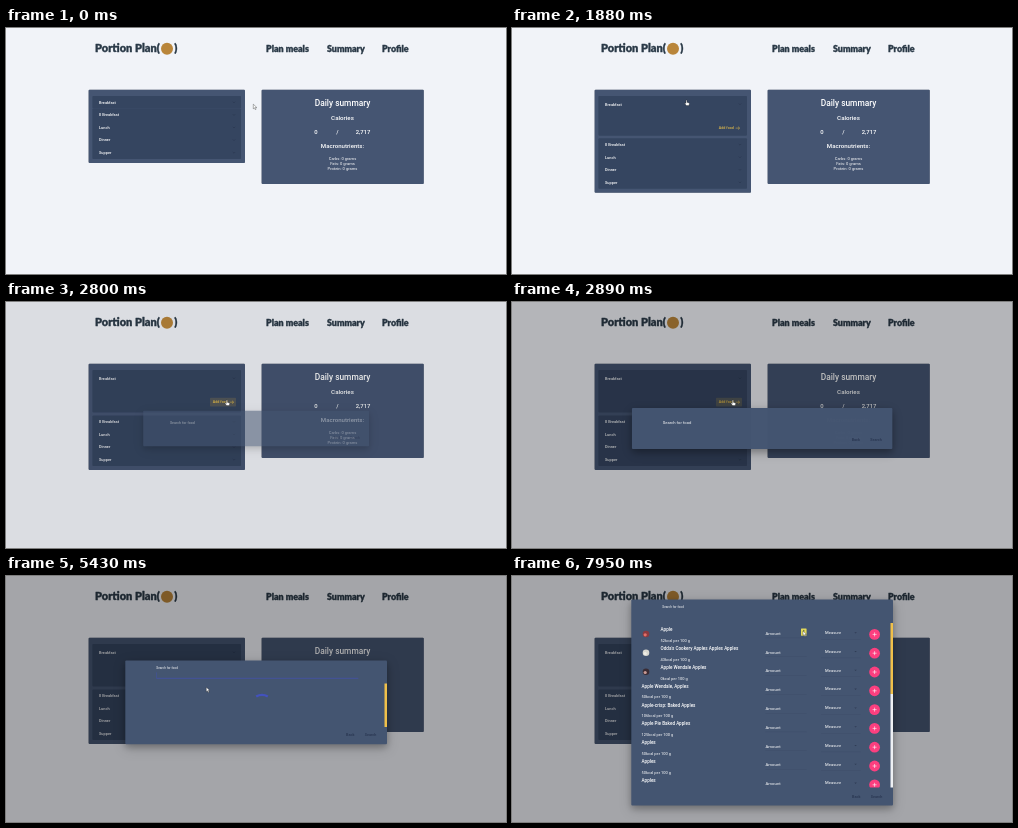
Write an HTML page that moves like this. It is 500 px wide and 246 px high and loops after 8 s.

```html
<!DOCTYPE html>
<html lang="en">
<head>
<meta charset="utf-8">
<title>Meal planner</title>
<style>
html, body { margin: 0; width: 100%; height: 100%; overflow: hidden; background: #f1f3f8; }
svg { display: block; width: 500px; height: 246px; }
text { font-family: Roboto, Inter, sans-serif; fill: #fff; white-space: pre; }
.head { font-family: Lato, "Open Sans", sans-serif; font-weight: 900; fill: #2a3947; stroke: #2a3947; stroke-width: .35; stroke-linejoin: round; }
.mid { text-anchor: middle; }
.bold { font-weight: 500; }
.dark { fill: #27344f; font-weight: 500; }
.card { filter: drop-shadow(0 .4px .5px rgba(0,0,0,.3)); }
#box { filter: drop-shadow(0 3px 3px rgba(0,0,0,.2)) drop-shadow(0 3px 6px rgba(0,0,0,.2)); }
</style>
</head>
<body>
<svg id="stage" viewBox="0 0 500 246"></svg>
<script>
const stage = document.getElementById('stage');

function add(parent, tag, attrs) {
  const el = document.createElementNS('http://www.w3.org/2000/svg', tag);
  set(el, attrs);
  parent.append(el);
  return el;
}
function set(el, attrs) {
  for (const k in attrs) el.setAttribute(k, attrs[k]);
}
const group = (parent, attrs = {}) => add(parent, 'g', attrs);
const rect = (parent, x, y, width, height, fill, more) =>
  add(parent, 'rect', { x, y, width, height, fill, ...more });
const circle = (parent, cx, cy, r, fill) => add(parent, 'circle', { cx, cy, r, fill });
const line = (parent, d, stroke, width = .5) =>
  add(parent, 'path', { d, stroke, 'stroke-width': width, fill: 'none' });
// y is the middle of the capital letters
function label(parent, x, y, str, size, cls = '') {
  const el = add(parent, 'text', { x, y: y + size * .36, 'font-size': size, class: cls });
  el.textContent = str;
  return el;
}
const show = (el, on) => el.setAttribute('visibility', on ? 'inherit' : 'hidden');
const shift = (el, x, y) => el.setAttribute('transform', `translate(${x} ${y})`);

const clamp = v => Math.min(1, Math.max(0, v));
function bezier(x1, y1, x2, y2) {
  const at = (a, b, s) => 3 * a * s * (1 - s) ** 2 + 3 * b * s * s * (1 - s) + s ** 3;
  return x => {
    if (x <= 0 || x >= 1) return clamp(x);
    let lo = 0, hi = 1;
    for (let i = 0; i < 24; i++) {
      const m = (lo + hi) / 2;
      if (at(x1, x2, m) < x) lo = m; else hi = m;
    }
    return at(y1, y2, lo);
  };
}
const standard = bezier(.4, 0, .2, 1);
const decelerate = bezier(0, 0, .2, 1);
const swift = bezier(.25, .8, .25, 1);

// Header
label(stage, 89, 20.5, 'Portion Plan(', 11, 'head');
circle(stage, 161, 20.8, 6, '#b9853a');
label(stage, 168.3, 20.5, ')', 11, 'head');
[[260, 'Plan meals'], [321, 'Summary'], [376, 'Profile']]
  .forEach(([x, str]) => label(stage, x, 20.3, str, 8.9, 'head'));

// Meals
const INNER = '#354560', PANEL = '#455572';
const meals = rect(stage, 82.6, 61.7, 156.4, 73.3, PANEL, { rx: 1, class: 'card' });
const first = rect(stage, 86.4, 68, 148.6, 12.6, INNER, { rx: .8 });
const chevron = (parent, y) => line(parent, `M226.8 ${y - .6}l1.2 1.2 1.2-1.2`, '#26334a');
const breakfast = group(stage);
label(breakfast, 93, 74.3, 'Breakfast', 3.9, 'bold');
chevron(breakfast, 74.3);

const addFood = group(stage);
const hover = rect(addFood, 204, 94.8, 26, 8.8, '#f0c040', { rx: .8, opacity: .16 });
label(addFood, 206.8, 99, 'Add food', 3.7, 'bold').style.fill = '#f0c548';
line(addFood, 'M223.6 99.2h4m-1.6-1.5l1.6 1.5-1.6 1.5', '#f0c548');

const others = group(stage);
rect(others, 86.4, 80.6, 148.6, 50.4, INNER, { rx: .8 });
['II Breakfast', 'Lunch', 'Dinner', 'Supper'].forEach((str, i) => {
  label(others, 93, 86.8 + 12.6 * i, str, 3.9, 'bold');
  chevron(others, 86.8 + 12.6 * i);
});

// Daily summary
rect(stage, 255.6, 61.7, 162.2, 94.2, PANEL, { rx: 1, class: 'card' });
[[336.5, 75, 'Daily summary', 8.4, 'bold'], [336.5, 90, 'Calories', 6.2, 'bold'],
 [310, 104, '0', 5.9, 'bold'], [331.3, 104, '/', 5.9, 'bold'], [357, 104, '2,717', 5.9, 'bold'],
 [336.5, 118, 'Macronutrients:', 6.1, 'bold'],
 [336.5, 130.7, 'Carbs: 0 grams', 4.1], [336.5, 135.6, 'Fats: 0 grams', 4.1],
 [336.5, 140.5, 'Protein: 0 grams', 4.1]]
  .forEach(([x, y, str, size, cls = '']) => label(stage, x, y, str, size, 'mid ' + cls));

// Dialog
const backdrop = rect(stage, 0, 0, 500, 246, '#000');
const dialog = group(stage);
const box = rect(dialog, 119.3, 0, 261.7, 0, '#445571', { rx: 1, id: 'box' });
const field = group(dialog);
const hint = label(field, 0, 0, 'Search for food', 4.2);
const typed = label(field, 150, 14.5, '', 4.4);
const caret = rect(field, 150, 11.7, .4, 5.8, '#3f51b5');
const underline = rect(field, 150.3, 17.3, 202, .6, '#4350b8');
const actions = group(dialog);
label(actions, 344.3, 0, 'Back', 3.8, 'dark mid');
label(actions, 364.6, 0, 'Search', 3.7, 'dark mid');
const thumb = rect(dialog, 378.5, 0, 2.5, 0, '#f0c04a');
const spinner = add(dialog, 'circle', {
  cx: 256, cy: 130.7, r: 11.7, fill: 'none', stroke: '#4352bd', 'stroke-width': 2.4
});

// Search results
const results = group(dialog);
rect(results, 378.5, 118, 2.5, 93.5, '#eef0f4');
const clip = add(add(stage, 'defs'), 'clipPath', { id: 'list' });
rect(clip, 119, 46, 259, 165.5);
const list = group(results, { 'clip-path': 'url(#list)' });
const foods = [['Apple', 52], ["Odda's Cookery Apples Apples Apples", 43], ['Apple Wendale Apples', 0],
  ['Apple Wendale, Apples', 50], ['Apple-crisp: Baked Apples', 106], ['Apple Pie Baked Apples', 125],
  ['Apples', 50], ['Apples', 50], ['Apples', 50]];
foods.forEach(([name, kcal], i) => {
  const row = group(list, { transform: `translate(0 ${18.8 * i})` });
  const x = i < 3 ? 148.6 : 129.6;
  label(row, x, 53.8, name, 4.6, 'bold');
  label(row, x, 64.6, kcal + 'kcal per 100 g', 4);
  label(row, 253.5, 57.2, 'Amount', 4.3);
  rect(row, 253.5, 61.8, 41, .3, '#3a4964');
  label(row, 313, 56.4, 'Measure', 4.2);
  add(row, 'path', { d: 'M342.3 56.2h2.6l-1.3 1.3z', fill: '#303d56' });
  rect(row, 309, 63, 39.5, .3, '#3a4964');
  circle(row, 362.6, 58.4, 5.4, '#fb3f7f');
  line(row, 'M360.6 58.4h4m-2-2v4', '#fff', .6);
});
const photo = (y, base, spot) => {
  const g = group(results);
  circle(g, 134, y, 3.3, base);
  circle(g, 133.2, y + .8, 1.6, spot);
  return g;
};
photo(58, '#8a3a40', '#e2716a');
const latePhotos = [photo(76.7, '#d9d8d0', '#f0eee6'), photo(95.7, '#3a2c34', '#c99a94')];
const stepper = group(results);
const stepperFace = rect(stepper, 289, 52.5, 5.6, 7.2, '#d9cf5a', { rx: .4 });
add(stepper, 'path', { d: 'M290.7 55.2l1.1-1.4 1.1 1.4zm0 1.8l1.1 1.4 1.1-1.4z', fill: '#56603f' });

// Pointer shapes, tip at 0,0
const pointer = group(stage, { stroke: '#222', 'stroke-width': .35, fill: '#fff' });
const arrow = add(pointer, 'path', { d: 'M0 0v4.6l1.1-1 .8 1.8.9-.4-.8-1.7h1.5z' });
const hand = add(pointer, 'path', {
  d: 'M-.5 .4q.5-.8 1 0v1.9l2 .6q.5.2.4.8l-.5 1.9h-2.6l-1.7-2.3q.3-.8 1.4.1z'
});
const beam = line(pointer, 'M-1 0h2m-1 0v5m-1 0h2', '#222');
const path = [[0, 247.3, 76.2], [810, 247.3, 76.2], [940, 171, 60], [1200, 171, 60], [1270, 97, 63],
  [1310, 225, 68], [1350, 174.5, 72], [1960, 174.5, 72], [2400, 220.8, 98], [3400, 220.8, 98],
  [3580, 200.3, 111.2], [6460, 200.3, 111.2], [7250, 287.5, 56], [7330, 287.5, 56], [7420, 288, 56.5],
  [7570, 288, 56.5], [7710, 291, 55], [8000, 291, 55]];
function pointerAt(t) {
  const i = path.findIndex(p => p[0] > t);
  const [a, b] = [path[i - 1], path[i]];
  const k = (t - a[0]) / (b[0] - a[0]);
  return [a[1] + (b[1] - a[1]) * k, a[2] + (b[2] - a[2]) * k];
}

const OPEN = 2767, SEARCH = 5430, LOADED = 5980;
const keys = [4440, 4500, 4650, 4910, 4960];

function draw(t) {
  const expand = standard((t - 1738) / 225);
  set(meals, { height: 73.3 + 33 * expand });
  set(first, { height: 12.6 + 30 * expand });
  shift(breakfast, 0, 2 * expand);
  shift(others, 0, 33 * expand);
  shift(addFood, 0, expand);
  set(addFood, { opacity: expand });
  show(hover, t > 2330 && t < 3100);

  set(backdrop, { opacity: .32 * swift((t - OPEN) / 400) });
  const grow = decelerate((t - OPEN) / 150), scale = .7 + .3 * grow;
  show(dialog, t > OPEN);
  set(dialog, {
    opacity: grow,
    transform: `translate(250 126.4) scale(${scale}) translate(-250 -126.4)`
  });
  const loading = t >= SEARCH && t < LOADED, loaded = t >= LOADED;
  const [top, height] = loaded ? [23.4, 206.2] : loading ? [84.6, 83.6] : [105.8, 41.2];
  set(box, { y: top, height });
  shift(field, 0, top);
  shift(actions, 0, top + height - 9.2);

  const float = swift((t - 2920) / 400);
  set(hint, { transform: `translate(150.3 ${14.2 - 6.6 * float}) scale(${1 - .25 * float})` });
  typed.textContent = t < SEARCH ? 'apple'.slice(0, keys.filter(k => t >= k).length) : '';
  const blink = t < 4440 ? t >= 3540 && t < 4040
    : t < 5140 || Math.floor((t - 5140) / 500) % 2 === 0;
  show(caret, blink);
  set(caret, { x: 150 + (typed.textContent ? typed.getComputedTextLength() : 0) });
  show(underline, loading);

  show(thumb, loading || loaded);
  set(thumb, loaded ? { y: 47, height: 71 } : { y: 107.5, height: 43.5 });
  show(spinner, loading);
  const spin = (t - SEARCH) / 550, arc = 12 + 40 * clamp(spin);
  set(spinner, {
    'stroke-dasharray': `${arc} 100`,
    transform: `rotate(${-120 + 110 * spin} 256 130.7)`
  });
  show(results, loaded);
  latePhotos.forEach(p => show(p, t >= 6170));
  show(stepper, t >= 7250);
  set(stepperFace, { fill: t >= 7950 ? '#e3d95c' : '#d3cb68' });

  shift(pointer, ...pointerAt(t));
  const isHand = t >= 1200 && t < 2960, isBeam = t >= 7180 && t < 7640;
  show(hand, isHand);
  show(beam, isBeam);
  show(arrow, !isHand && !isBeam);
}

function tick() {
  draw(performance.now() % 8000);
  requestAnimationFrame(tick);
}
tick();
</script>
</body>
</html>
```
